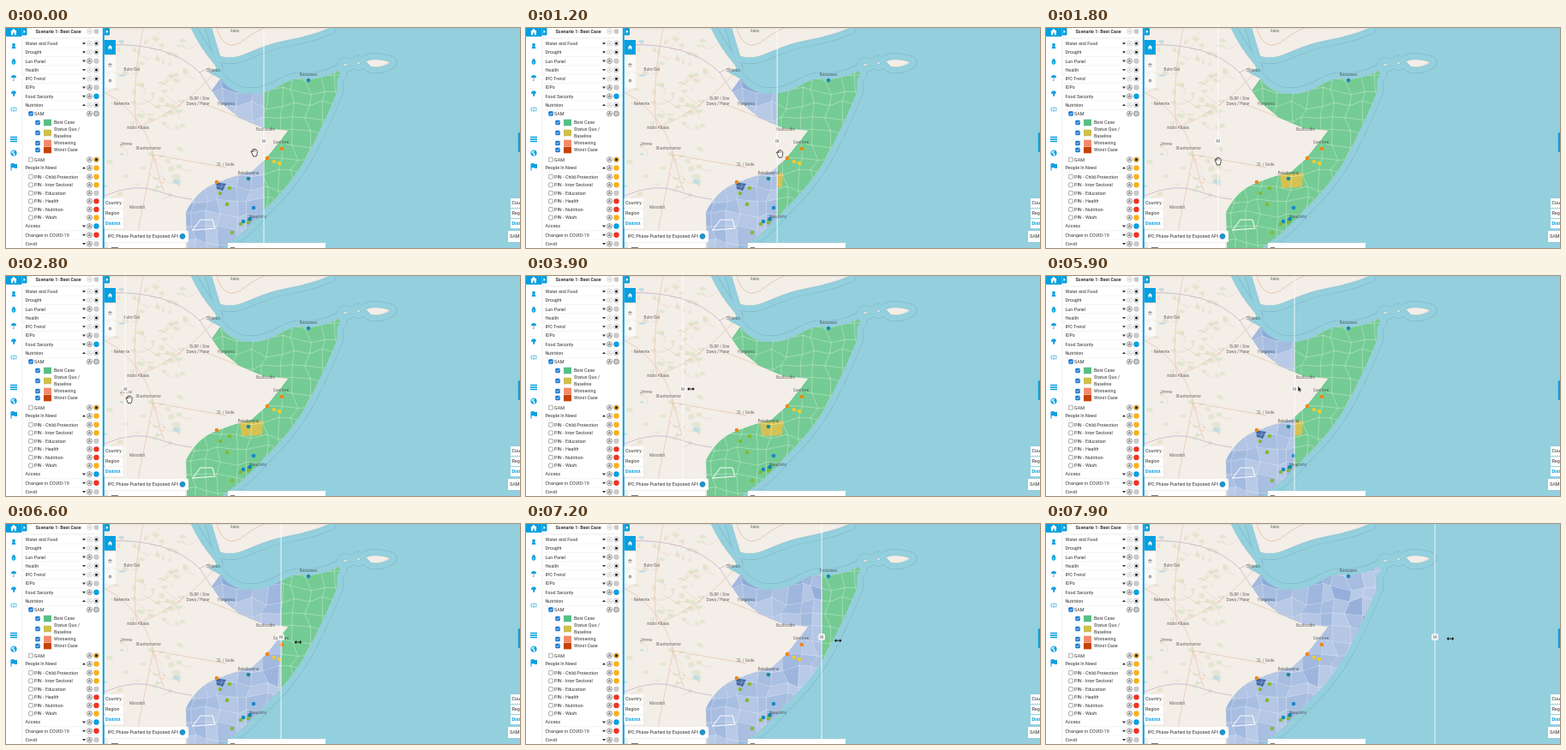
Recreate the animation shown at these times as an HTML page. Size 600x257 px, loop 8 s.

```html
<!DOCTYPE html>
<html lang="en">
<head>
<meta charset="utf-8">
<style>
html, body { margin: 0; width: 100%; height: 100%; overflow: hidden; }
svg { display: block; width: 600px; height: 257px; font: 5.4px Roboto, Arial, sans-serif; }
</style>
</head>
<body>
<svg id="stage" viewBox="0 0 600 257"></svg>
<script>
const BLUE = '#079fdf', AMBER = '#fbb116', RED = '#ef3324', GREY = '#c9c9c9', INK = '#333';
const SEA = '#93cfdd', LAND = '#f3eee7', ROAD = '#e4b69b';
const DURATION = 8000;

const rect = (x, y, w, h, fill, more = '') =>
  `<rect x="${x}" y="${y}" width="${w}" height="${h}" fill="${fill}" ${more}/>`;
const dot = (x, y, r, fill, more = '') => `<circle cx="${x}" cy="${y}" r="${r}" fill="${fill}" ${more}/>`;
const path = (d, fill, more = '') => `<path d="${d}" fill="${fill}" ${more}/>`;
const line = (d, color, width = 1, more = '') =>
  path(d, 'none', `stroke="${color}" stroke-width="${width}" ${more}`);
const text = (x, y, s, more = '') => `<text x="${x}" y="${y + 1.9}" fill="${INK}" ${more}>${s}</text>`;
const times = (n, make) => Array.from({ length: n }, (_, i) => make(i));

let seed = 7;
const rnd = () => (seed = seed * 16807 % 2147483647) / 2147483647;
const between = (a, b) => a + (b - a) * rnd();

// Land: a few key points per outline
const coast = 'L250,59Q262,76 282,77T320,67T352,60Q372,59 388,50L391,54 386,61 386,76Q372,110 354,145T301,213Q284,235 252,257';
const border = 'L211,257 210,215Q222,190 245,181T286,168L303,153 329,120 300,117 272,105 248,85 240,73Z';
const africa = `M110,0L216,0Q226,22 243,42L246,47 237,52 ${coast}L110,257Z`;
const arabia = 'M240,0L250,33Q264,37 278,31T303,21T330,14T362,6L378,0Z';
const island = 'M420,39Q430,34 449,40Q437,48 426,45ZM394,42h4v2h-4zM410,40h3v2h-3z';
const somalia = `M240,73${coast}${border}`;
const lands = [africa, arabia, island];

// Woodland, lakes and minor roads
const terrain = times(80, i => {
  const x = between(116, 210), y = between(10, 200);
  return `<ellipse cx="${x}" cy="${y}" rx="${between(1, 5)}" ry="${between(1, 3)}"
    fill="${i % 16 ? '#d3dfba' : SEA}" opacity=".5"/>`
    + (i % 2 ? line(`M${x},${y}q${between(-8, 8)},${between(0, 10)} ${between(-20, 20)},${between(-12, 18)}`, ROAD, .5, 'opacity=".6"') : '');
}).join('');
const roads = 'M115,75Q160,100 172,148T185,190M153,116Q200,100 242,54M153,116Q145,78 160,0M172,148L257,163M225,86L303,117M172,148L150,257';
const borders = 'M115,196Q150,181 176,190T217,200M240,73L226,52 238,46M226,52Q190,16 115,20';

// Districts: a jittered mesh clipped to the country
const COLS = 13, ROWS = 15;
const nodes = times(ROWS, r => times(COLS, c => [200 + c * 17 + between(-5, 5), 42 + r * 16 + between(-5, 5)]));
let mesh = '', shades = '';
for (let r = 1; r < ROWS; r++) for (let c = 1; c < COLS; c++) {
  const cell = `M${[nodes[r - 1][c - 1], nodes[r - 1][c], nodes[r][c], nodes[r][c - 1]].join('L')}Z`;
  const depth = rnd() ** 2 * (r < 6 ? .8 : .5);
  mesh += cell;
  shades += path(cell, '#6f93cf', `opacity="${depth}"`);
}
const layer = (clip, color, patches, edge) => `<g clip-path="url(#${clip})"><g clip-path="url(#country)" opacity=".9">`
  + path(somalia, color) + patches + line(mesh, '#fff', .5, `opacity="${edge}"`) + '</g></g>';
const blueLayer = layer('before', '#b3c6e7', shades + path('M245,180L257,182 253,190 246,188Z', '#315b9e'), .3);
const greenLayer = layer('after', '#66c78a', path('M273,171L300,169 299,186 275,187Z', '#d1bd45'), .35);

const places = [
  [147, 48, 'Bahir Dar'], [242, 49, 'Djibouti'], [226, 82, 'ELRP / Dire'], [224, 88, 'Dawa / Harar'],
  [257, 88, 'Hargeysa'], [353, 54, 'Boosaaso'], [303, 118, 'Buuhoodle'], [321, 133, 'Garoowe'],
  [154, 116, 'Addis Ababa'], [166, 140, 'Shashamanne'], [256, 159, "'ZL / Gode"],
  [283, 169, 'Beledweyne'], [153, 209, 'Marsabit'], [294, 220, 'Muqdisho'], [267, 3, 'Aden'],
  [135, 88, 'Nekemte'], [140, 135, 'Jimma'],
].map(([x, y, s]) => text(x, y, s, 'text-anchor="middle" font-size="4.6" opacity=".72"')).join('');

const markers = Object.entries({
  '#1787c8': [[353, 61], [289, 210], [277, 226], [285, 223]],
  '#ee8616': [[322, 141], [305, 152], [246, 180]],
  '#f2cb2d': [[313, 156], [319, 158]],
  '#16899b': [[283, 176], [284, 224]],
  '#83b935': [[250, 193], [261, 187], [258, 206], [274, 229], [283, 227], [264, 239]],
}).map(([color, spots]) => spots.map(([x, y]) => dot(x, y, 2.3, color)).join('')).join('');

// Territorial waters are a thin rim left between two wide strokes
const map = rect(115, 0, 485, 257, SEA)
  + [['#78b1c4', 15], [SEA, 14]].map(([color, w]) => lands.map(d => line(d, color, w, 'stroke-linejoin="round"')).join('')).join('')
  + lands.map(d => path(d, LAND, 'stroke="#86b5c2" stroke-width=".4"')).join('')
  + `<g clip-path="url(#land)">${terrain}${line(roads, ROAD, .7, 'opacity=".8"')}</g>`
  + line('M246,0Q256,32 279,13T322,0', ROAD, .7)
  + line(borders, '#bfa3bf', .8, 'opacity=".8"')
  + blueLayer + greenLayer
  + line('M218,236L227,224H241L244,234Z', '#fff', 1.1, 'opacity=".9"')
  + places + markers;

// Sidebar
const down = y => path(`M89,${y - 1}h4l-2,2.4z`, INK);
const up = y => path(`M89,${y + 1}h4l-2,-2.4z`, INK);
const badge = (y, faint) => dot(97.5, y, 3, '#fff', `stroke="${faint ? '#bbb' : '#555'}" stroke-width=".6"`)
  + line(`M96,${y + 1.5}l1.5,-3.3 1.5,3.3m-2.4,-1h1.8`, faint ? '#bbb' : INK, .6);
const radio = (y, fill = '#fff') => dot(105.5, y, 3, fill, 'stroke="#999" stroke-width=".6"') + dot(105.5, y, 1.5, '#111');
const check = (x, y, on) => rect(x - 2.4, y - 2.4, 4.8, 4.8, on ? '#1877d2' : '#fff', `rx=".6" stroke="${on ? '#1877d2' : '#777'}" stroke-width=".6"`)
  + (on ? line(`M${x - 1.4},${y}l1,1.2 2,-2.4`, '#fff', .8) : '');

const group = (top, rows) => rows.map(([name, color, arrow = down], i) => {
  const y = top + i * 10.3;
  return line(`M20,${y + 5.2}H112`, '#e8e8e8', .5) + text(22.5, y, name) + arrow(y)
    + badge(y, !color) + (color ? dot(105.5, y, 3.2, color) : radio(y));
}).join('');
const groups = group(18, [['Water and Food'], ['Drought'], ['Lun Panel', GREY], ['Health'], ['IPC Trend'],
  ['IDPs', GREY], ['Food Security', BLUE], ['Nutrition', '', up]])
  + group(163.5, [['People In Need', AMBER, up]])
  + group(231.5, [['Access', BLUE], ['Changes in COVID-19', RED], ['Covid', GREY]]);

const needs = [['Child Protection', AMBER], ['Inter Sectoral', AMBER], ['Education', GREY],
  ['Health', RED], ['Nutrition', RED], ['Wash', AMBER]].map(([name, color], i) => {
  const y = 173.7 + i * 9.55;
  return check(29, y) + text(33, y, 'PIN - ' + name) + badge(y) + dot(105.5, y, 3.2, color);
}).join('');

const legend = [[110.5, '#55bd82'], [122.5, '#cfc04b'], [134.5, '#f48a69'], [142.5, '#c6420b']]
  .map(([y, color]) => check(37, y, true) + rect(44, y - 3.8, 9, 7.6, color)).join('')
  + ['Best Case', 'Status Quo /', 'Baseline', 'Worsening', 'Worst Case']
    .map((s, i) => text(56, 110.5 + i * 8, s)).join('');

const home = (x, y, s) => `<g transform="translate(${x} ${y}) scale(${s})">${path('M-4,0L0,-4 4,0H3V4H1V1H-1V4H-3V0Z', '#fff')}</g>`;
const icon = (y, art, s = .75) => `<g transform="translate(9 ${y}) scale(${s})">${art}</g>`;
const icons = rect(0, 0, 18.5, 10, BLUE) + home(9, 4.5, .95)
  + icon(21, dot(0, -2, 2.5, BLUE) + path('M-3,4q0,-4 3,-4t3,4z', BLUE))
  + icon(39, path('M0,-5q4,5 3,7a3,3 0 0 1 -6,0q-1,-2 3,-7z', BLUE) + dot(0, 2, 1, '#fff'))
  + icon(58, path('M-4,0a4,4 0 0 1 8,0zM-.5,0h1v5h-2v-1h1z', BLUE))
  + icon(76, path('M-4,1a4,4 0 0 1 8,-1l-2,1 -1,4h-2v-4z', BLUE))
  + icon(95, line('M-4,-2.5q2.5,-1 4,.5 1.5,-1.5 4,-.5v5q-2.5,-1 -4,.5 -1.5,-1.5 -4,-.5zM0,-2v5', BLUE, .8))
  + icon(130, line('M-4,-2.5h8M-4,0h8M-4,2.5h8', BLUE, 1.7), 1)
  + icon(146, dot(0, 0, 3.6, BLUE) + path('M-2,-2.5h3l-1,2 2,2 -2,2 -1,-3 -2,-1z', '#fff', 'opacity=".8"'), 1)
  + icon(162, line('M-3,-3.5v8', BLUE) + path('M-3,-3.5q2,-1 4,0t3,0v5q-2,1 -3,0t-4,0z', BLUE), 1);

const tab = x => rect(x, 0, 6, 8.5, BLUE) + path(`M${x + 2},2.2l2.4,2 -2.4,2z`, '#fff');
const sidebar = rect(0, 0, 113.5, 257, '#fff') + line('M19,0V257', '#e5e5e5', .6) + icons + tab(18.5)
  + text(34.5, 4.3, 'Scenario 1: Best Case', 'font-weight="700"') + badge(4, true) + dot(105.5, 4, 3, GREY)
  + line('M20,12H112', '#ddd', .6) + groups
  + check(29, 100, true) + text(33, 100, 'SAM') + badge(100) + dot(105.5, 100, 3, GREY, 'stroke="#777" stroke-width=".7"')
  + legend + check(29, 153.7) + text(33, 153.7, 'GAM') + badge(153.7) + radio(153.7, AMBER) + needs
  + rect(112.8, 0, 2, 257, BLUE) + tab(115);

// Controls floating above the map
const levels = x => ['Country', 'Region', 'District'].map((s, i) =>
  rect(x - 1.5, 199 + i * 12, 22, 11, '#fff')
  + text(x, 204.5 + i * 12, s, i == 2 ? `font-weight="700" style="fill:${BLUE}"` : '')).join('');
const controls = rect(115, 14, 13, 17, BLUE) + home(121.5, 22.5, .65)
  + rect(115, 33, 13, 17.5, '#fff', 'opacity=".65"') + rect(115, 52.5, 13, 17.5, '#fff', 'opacity=".65"')
  + path('M119,42.5l2.5,-1.5 2.5,1.5 -2.5,1.5z', '#999') + line('M119,44l2.5,1.5 2.5,-1.5', '#999', .6)
  + dot(121.5, 61.5, 2, '#aaa')
  + levels(116) + levels(590.5)
  + rect(115, 237, 98, 13, '#fff') + text(118.5, 243.3, 'IPC Phase Pushed by Exposed API')
  + dot(206, 243.3, 3.1, '#1299dc', 'stroke="#356" stroke-width=".4"')
  + rect(586, 237, 14, 13, '#fff') + text(588, 243.3, 'SAM')
  + rect(119, 251, 90, 6, '#fff') + rect(259, 251, 114, 6, '#fff') + line('M123,256.5h8M262,256.5h5', '#777', 1.2)
  + rect(597.8, 122, 3, 23, BLUE, 'rx="1.5"');

const cursors = {
  hand: path('M-3,0L-4,-2 -2.8,-2.6 -2,-1.3 -2,-4 0,-4.6 2.2,-3.8 3.2,-2.8 3.2,1 2,4 -1.4,4Z', '#fff', 'stroke="#222" stroke-width=".8"')
    + line('M-.7,-3.8V-1.4M1,-3.7V-1.4', '#222', .5),
  resize: line('M-3,0H3', '#111', 1) + path('M-4.3,0l2.3,-2v4zM4.3,0l-2.3,-2v4z', '#111'),
  arrow: path('M-1,-3.5V3L.5,1.7 1.6,4 2.6,3.5 1.6,1.4 3.5,1.2Z', '#111', 'stroke="#fff" stroke-width=".4"'),
};

document.getElementById('stage').innerHTML = `<defs>
  <clipPath id="country">${path(somalia, '#000')}</clipPath>
  <clipPath id="land">${path(africa, '#000')}</clipPath>
  <clipPath id="before"><rect id="leftClip" height="257"/></clipPath>
  <clipPath id="after"><rect id="rightClip" width="600" height="257"/></clipPath></defs>`
  + map
  + `<g id="swipe">${rect(-.5, 0, 1, 257, '#fff', 'opacity=".85"')}`
  + rect(-4, 128, 8, 8, '#f5f5f5', 'rx="2.5" opacity=".95"')
  + line('M-1.4,130.3v3.4M0,130.3v3.4M1.4,130.3v3.4', '#777', .7) + '</g>'
  + sidebar + controls
  + Object.entries(cursors).map(([id, art]) => `<g id="${id}">${art}</g>`).join('');

// Motion keys: divider [time, x]; grip [time, cursor offset from divider, cursor y]
const swipeKeys = [[0, 301], [1150, 301], [1800, 201], [3050, 124], [3500, 172], [3900, 183], [4500, 193],
  [5100, 242], [5900, 290], [6600, 321], [7200, 345], [7900, 454]];
const gripKeys = [[0, -11, 146], [700, 6, 140], [1800, 0, 156], [3900, 9.5, 132], [5100, 11.5, 132],
  [5900, 5, 132], [6600, 20, 138], [7900, 18, 134]];
const cursorKinds = [[0, 'hand'], [3600, 'resize'], [4600, 'hand'], [5500, 'arrow'], [6200, 'resize']];

function sample(keys, t) {
  const i = keys.findIndex(k => k[0] > t);
  if (i < 0) return keys.at(-1).slice(1);
  const a = keys[i - 1], b = keys[i], f = (t - a[0]) / (b[0] - a[0]);
  return a.slice(1).map((v, n) => v + (b[n + 1] - v) * f);
}

const el = id => document.getElementById(id);
function draw(now) {
  const t = now % DURATION;
  const [x] = sample(swipeKeys, t), [offset, y] = sample(gripKeys, t);
  el('leftClip').setAttribute('width', x);
  el('rightClip').setAttribute('x', x);
  el('swipe').setAttribute('transform', `translate(${x} 0)`);
  const kind = cursorKinds.findLast(k => k[0] <= t)[1];
  for (const id in cursors) {
    el(id).style.display = id === kind ? '' : 'none';
    el(id).setAttribute('transform', `translate(${x + offset} ${y})`);
  }
}

const start = performance.now();
function tick() {
  draw(performance.now() - start);
  requestAnimationFrame(tick);
}
tick();
</script>
</body>
</html>
```
